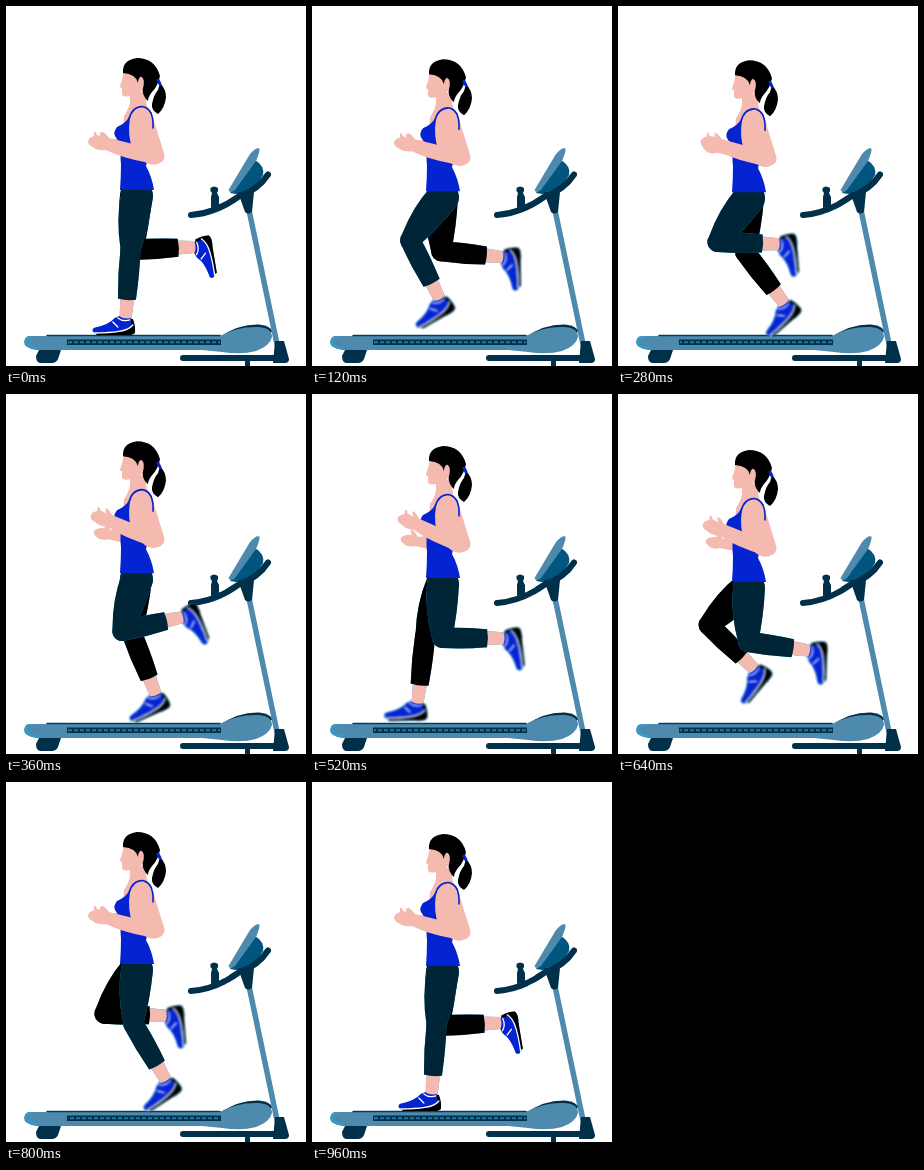
These frames come from a looping animation (300 by 360 pixels, 1 s). An HTML page:

```html
<!DOCTYPE html>
<html lang="en">
<head>
<meta charset="utf-8">
<title>Treadmill run</title>
<style>
html, body { margin: 0; height: 100%; overflow: hidden; background: #fff; }
svg { display: block; width: 300px; height: 360px; }
.skin { fill: #f4b9af; }
.blue { fill: #0424d2; }
.dark { fill: #00304a; }
.mid { fill: #00567f; }
.light { fill: #4d8aad; }
.line { fill: none; stroke-linecap: round; }
</style>
</head>
<body>
<svg viewBox="0 0 300 360">
  <g id="machine">
    <path class="dark" d="M33 344H55L52 353Q50 357 46 357H34Q30 356 30 350Z"/>
    <path class="line" d="M177 352H268" stroke="#00304a" stroke-width="6"/>
    <path class="dark" d="M239 354h5v6h-5z"/>
    <path class="line" d="M243 204L271 338" stroke="#4d8aad" stroke-width="5.5"/>
    <path class="dark" d="M214 331Q232 318 253 318.500Q266 320 266 326L250 332Z"/>
    <path class="light" d="M23 330H214Q232 320 253 321Q266 322 266 331Q264 340 250 345Q236 349 216 346L196 344H30Q18 342 18 336Q19 330 23 330Z"/>
    <path class="line" d="M27 331Q20 331 20 336Q21 341 30 342" stroke="#2f9fcc" stroke-width="2"/>
    <path class="line" d="M41 329.500H214" stroke="#00405f" stroke-width="1.500"/>
    <path class="dark" d="M61 333.500h154v5.500h-154z"/>
    <path id="belt" class="line" d="M62 336.300H214" stroke="#1f7ba6" stroke-width="2" stroke-dasharray="4 2" style="stroke-linecap:butt"/>
    <path class="dark" d="M269 335H278L283 353Q283 357 279 357H267Z"/>
    <path class="mid" d="M224 187L249 154Q259 160 257 169Q248 186 236 189Z"/>
    <path class="light" d="M222.500 184L244 148Q250 141 253.500 142.500Q254 146 250 155L229 184Q224 188 222.500 184Z"/>
    <path class="line" d="M185 209Q210 207 232 191Q252 184 262 168.500" stroke="#00304a" stroke-width="6"/>
    <path class="dark" d="M232 186L248 186L246 206Q242 209 239 206Z"/>
    <path class="dark" d="M205 202V191L206 187L204.500 185V182Q208 179 212 182V185L211 187L213 191V200Z"/>
  </g>
  <g id="farLeg"></g>
  <g id="nearLeg"></g>
  <g id="body">
    <path id="farArm" class="skin" d="M126 131L101 134Q97 127 94 126Q93 129 95 132Q87 131 84 135Q83 138 86 140Q90 145 98 143L126 149Z"/>
    <path class="skin" d="M124 80V96Q123 103 118 110L117 124L146 122V108Q139 102 140 88Z"/>
    <path class="skin" d="M118 64Q117 73 114 80Q114 82 116 82L116 87Q116 91 121 90.500L130 89Q140 84 139 68Z"/>
    <path d="M117 67Q116 54 131 52Q149 52 154 70Q152 80 146 86Q142 91 142 95Q137 91 136.500 84Q140 73 135 70.500Q132 72 132 77Q130 68 117 67Z"/>
    <path d="M154 77Q160 83 160 91Q159 102 152 108Q145 104 146 98Q148 88 152 84Z"/>
    <path class="line" d="M152 74L154 78" stroke="#0424d2" stroke-width="3"/>
    <path class="blue" d="M123 111Q120 117 111 121Q107 126 109 130L115 139Q114 150 115 158Q115 170 114 184H148Q146 171 140 160L146 135V107L141 102L127 106Z"/>
    <path class="skin" d="M124 112Q126 101 135 101.500Q145 102 147 112L157 144Q161 154 154 157Q146 161 139 156L127 144Q121 130 124 112Z"/>
    <path class="line" d="M123 113Q126 101 136 100.500Q146 102 147 116V122" stroke="#0424d2" stroke-width="1.600"/>
    <path id="nearArm" class="skin" d="M150 158Q157 156 156 148Q153 141 143 142L103 132Q98 125 96 126Q95 128 97 131L91 129Q90 125 88 126L88 130Q82 132 82 136Q83 140 87 141Q92 145 100 144Q118 153 150 158Z"/>
  </g>
</svg>
<script>
const $ = id => document.getElementById(id);
const LOOP = 960, STRIDE = LOOP / 2, STEP = 40;

const legMarkup = color => `
  <g><g><g>
    <path d="M1 3L7 4Q10 12 9 18Q6 21 -3 20L-29 20.500L-31 16Z"/>
    <path class="blue" d="M-6 1L4 2L6 10Q3 16 -8 17L-31 18Q-35 16 -32 13Q-17 10 -11 3Z"/>
    <path class="line" d="M-31 18Q-16 18 -7 16.500Q3 15 7 10M-13 7L-8 12M-8 3Q-3 7 4 5" stroke="#fff" stroke-width="1.300"/>
  </g>
    <path class="skin" d="M-7 44H7.500L6 68Q0 71 -6 68Z"/>
    <path fill="${color}" d="M-10 0A10 10 0 0 1 10 0Q11 22 9 50Q0 52 -9 50Q-11 25 -10 0Z"/>
  </g>
    <path fill="${color}" d="M-16 0A16 16 0 0 1 16 0Q15 30 10 54A10 10 0 0 1 -10 54Q-18 26 -16 0Z"/>
  </g>`;

// Key poses of one leg's cycle: time, thigh angle, shin angle
const gait = [
  [0, 7, 4], [50, 21, 7], [160, 47, -46], [200, 36, -88], [320, 36, -88],
  [360, 16, -103], [500, 1, -91], [640, 1, -82], [680, 1, -52],
  [800, 4, -30], [LOOP, 7, 4]
];
// Body height over one stride
const bounce = [[0, 0], [100, 0], [160, 4], [200, 11], [320, -2], [390, -7], [STRIDE, 0]];

function sample(keys, t) {
  const i = Math.max(1, keys.findIndex(k => k[0] >= t));
  const p = keys[i - 1], q = keys[i];
  const u = (t - p[0]) / (q[0] - p[0]);
  return p.slice(1).map((v, j) => v + (q[j + 1] - v) * u);
}

const place = (el, transform) => el.setAttribute('transform', transform);

function poseLeg(leg, t, x, y, still) {
  const [a, b] = sample(gait, t);
  const thigh = leg.firstElementChild;
  const shin = thigh.firstElementChild;
  const foot = shin.firstElementChild;
  const toe = Math.min(0, b * 1.06);
  // A raised shin looks a little shorter
  const len = 1 - .1 * Math.abs(Math.sin(b * Math.PI / 180));
  place(thigh, `translate(${x} ${y}) rotate(${a})`);
  place(shin, `translate(0 54) rotate(${b - a}) scale(1 ${len})`);
  place(foot, `translate(0 66) scale(1 ${1 / len}) rotate(${toe - b})`);
  leg.style.filter = (still ? '' : 'blur(.7px) ') + 'drop-shadow(0 0 .5px #2a9fd0)';
  foot.style.filter = still ? 'none' : 'blur(.9px)';
}

$('farLeg').innerHTML = legMarkup('#000');
$('nearLeg').innerHTML = legMarkup('#002536');

function draw(now) {
  const t = Math.floor(now % 1000 / STEP) * STEP % LOOP;
  const [dy] = sample(bounce, t % STRIDE);
  const swing = -1.3 * Math.cos((t - 20) / LOOP * 2 * Math.PI);
  const lift = Math.max(0, Math.min(1, swing));
  place($('body'), `translate(0 ${dy})`);
  poseLeg($('farLeg'), (t + STRIDE) % LOOP, 130, 190 + dy, t === 0);
  poseLeg($('nearLeg'), t, 131, 190 + dy, t === 0);
  place($('farArm'), `translate(${5 * lift} ${9 * lift})`);
  place($('nearArm'), `rotate(${10 * lift} 148 150)`);
  $('belt').setAttribute('stroke-dashoffset', t / 20);
  requestAnimationFrame(draw);
}
draw(0);
</script>
</body>
</html>
```
